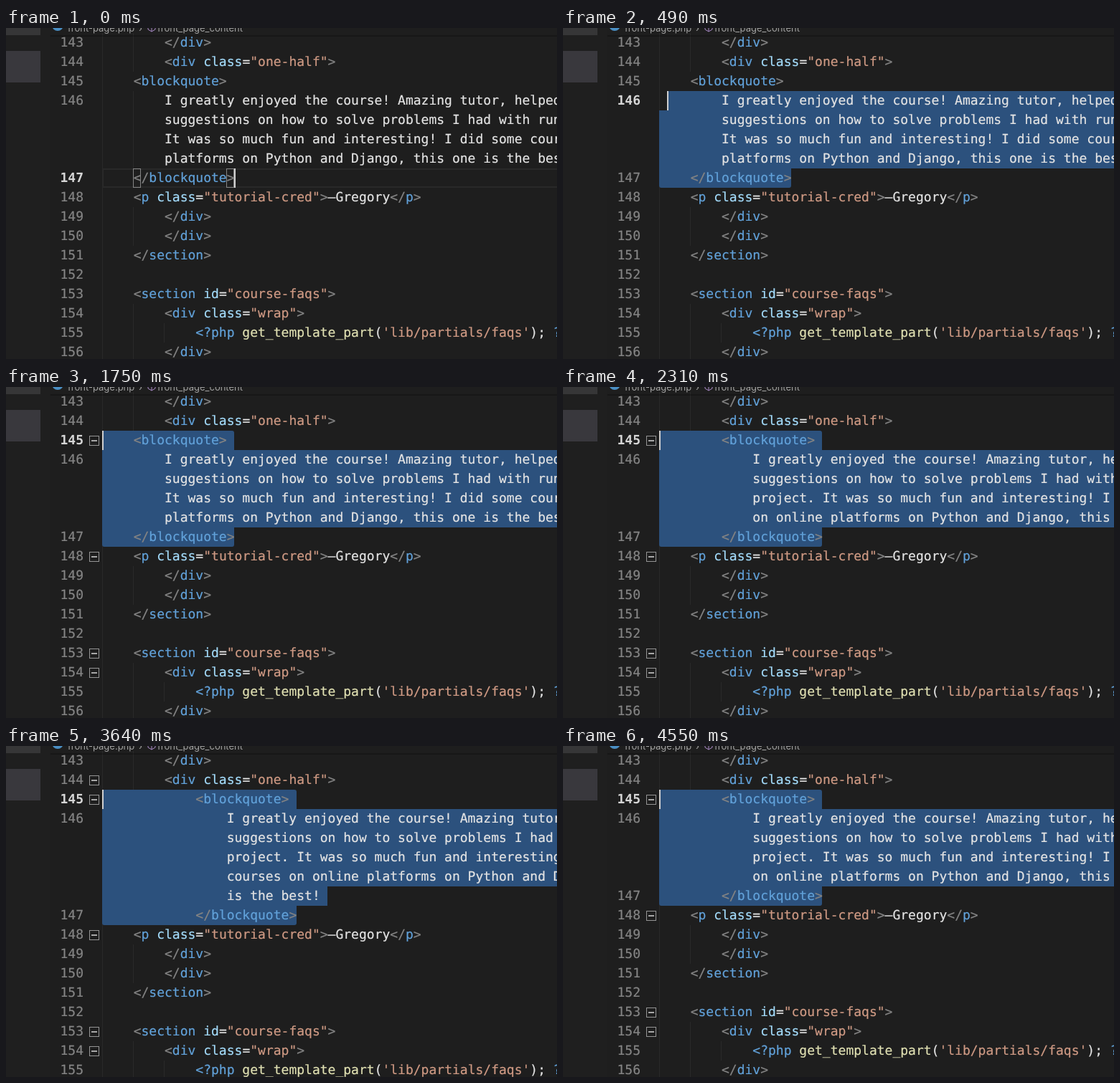
Recreate the animation shown at these times as an HTML page. Size 768 by 462 pixels, loop 4620 ms.

```html
<!DOCTYPE html>
<html lang="en">
<head>
<meta charset="utf-8">
<title>Indenting a block of code</title>
<style>
  html, body { margin: 0; width: 768px; height: 462px; overflow: hidden; background: #1e1e1e; }
  #stage { position: relative; width: 768px; height: 462px; overflow: hidden; }
  #stage div { position: absolute; box-sizing: border-box; }
  #code, #side, #crumbs { left: 0; top: 0; width: 768px; height: 462px; }
  .text, .num {
    height: 27px; white-space: pre; color: #e4e4e4;
    font: 18px/27px "DejaVu Sans Mono", monospace;
    text-rendering: geometricPrecision; font-variant-ligatures: none;
    -webkit-text-stroke: .2px;
  }
  .num { left: 48px; width: 60px; text-align: right; color: #858585; }
  .num.on { color: #d6d6d6; font-weight: bold; -webkit-text-stroke: 0; }
  .p { color: #848484; }
  .t { color: #62a2da; }
  .a { color: #a3dbfa; }
  .s { color: #cf9a84; }
  .f { color: #e0e0b2; }
  .sel { background: #2c517d; height: 27px; }
  .guide { width: 1px; height: 27px; background: rgba(255, 255, 255, .05); }
  .line { left: 134px; width: 640px; height: 27px; border: 2px solid #292929; }
  .match { width: 11px; height: 27px; border: 1px solid #858585; }
  .caret { width: 2px; height: 27px; background: #cfcfcf; }
  .fold { left: 116px; width: 14px; height: 14px; border: 1px solid #959595; }
  .fold::after { content: ""; position: absolute; left: 2px; top: 5px; width: 8px; height: 2px; background: #a8a8a8; }
  .crumb { top: -10px; white-space: pre; color: #a2a2a2; font: 13px/20px Inter, sans-serif; }
</style>
</head>
<body>
<div id="stage">
  <div id="side">
    <div style="left:0;top:0;width:61px;height:462px;background:#1f1f1f"></div>
    <div style="left:0;top:0;width:48px;height:10px;background:#363637"></div>
    <div style="left:0;top:32px;width:48px;height:44px;background:#39383d"></div>
  </div>
  <div id="code"></div>
  <div id="crumbs">
    <div style="left:62px;top:10px;width:706px;height:2px;background:rgba(0,0,0,.25)"></div>
    <div style="left:64px;top:-12px;width:16px;height:16px;border-radius:50%;background:#4a8fc4"></div>
    <div class="crumb" style="left:86px">front-page.php</div>
    <div class="crumb" style="left:185px">›</div>
    <svg style="position:absolute;left:197px;top:-7px" width="12" height="13" fill="none" stroke="#a98ac8">
      <path d="M6 1 11 3.5V9L6 12 1 9V3.5ZM1 3.5 6 6 11 3.5M6 6V12"/>
    </svg>
    <div class="crumb" style="left:211px">front_page_content</div>
  </div>
</div>
<script>
const LOOP = 4620, STEP = 70;
const X0 = 134.3, CHAR = 10.836, TOP = 7, ROW = 27, FIRST = 2;
const code = document.getElementById('code');

// How the long paragraph wraps at each indent level
const QUOTE = [
  ['I greatly enjoyed the course! Amazing tutor, helped with',
   'suggestions on how to solve problems I had with running my project.',
   'It was so much fun and interesting! I did some courses on online',
   'platforms on Python and Django, this one is the best!'],
  ['I greatly enjoyed the course! Amazing tutor, helped with',
   'suggestions on how to solve problems I had with running my',
   'project. It was so much fun and interesting! I did some courses',
   'on online platforms on Python and Django, this one is the best!'],
  ['I greatly enjoyed the course! Amazing tutor, helped with',
   'suggestions on how to solve problems I had with running my',
   'project. It was so much fun and interesting! I did some',
   'courses on online platforms on Python and Django, this one',
   'is the best!']
];
const BEFORE = [[2, '</div>'], [2, '<div class="one-half">']];
const AFTER = [
  [1, '<p class="tutorial-cred">–Gregory</p>'],
  [2, '</div>'], [2, '</div>'], [1, '</section>'], [1, ''],
  [1, '<section id="course-faqs">'],
  [2, '<div class="wrap">'],
  [3, "<?php get_template_part('lib/partials/faqs'); ?>"],
  [2, '</div>']
];

const span = (cls, s) => `<span class="${cls}">${s.replace(/</g, '&lt;')}</span>`;
const TOKENS = /(<\?php|\?>)|(<\/?)(\w+)|("[^"]*"|'[^']*')|(>)|(\w+)(?==")|(get_\w+)/g;
const paint = s => s.replace(TOKENS, (m, php, open, tag, str, close, attr) =>
  php ? span('t', m) :
  open ? span('p', open) + span('t', tag) :
  span(str ? 's' : close ? 'p' : attr ? 'a' : 'f', m));

const colX = col => X0 + col * CHAR;
const edgeX = col => Math.floor(colX(col));
const rowY = row => TOP + row * ROW;
const box = (cls, x, y, extra = '', body = '') =>
  `<div class="${cls}" style="${x === null ? '' : `left:${x}px;`}top:${y}px;${extra}">${body}</div>`;

function rowsAt(level) {
  let n = 143;
  const one = ([indent, text]) => ({ num: n++, indent, text });
  const rows = BEFORE.map(one);
  rows.push(one([1 + level, '<blockquote>']));
  QUOTE[level].forEach((text, i) =>
    rows.push({ num: i ? 0 : n, indent: 2 + level, text }));
  n++;
  rows.push(one([1 + level, '</blockquote>']));
  return rows.concat(AFTER.map(one));
}

// Pose at a time: indent level, caret place, fold marks
function pose(t) {
  const level = t < 2100 ? 0 : t < 2450 ? 1 : t < 4200 ? 2 : 1;
  if (t >= 560) return { level, row: FIRST, col: 0, folds: t >= 630 };
  const p = Math.min(1, Math.max(0, (t - 140) / 350));
  return { level, row: Math.round(7 - 4 * p), col: Math.round(17 - 16 * p), folds: false };
}

function selection(rows, last, { row, col }) {
  let out = '';
  const endCol = r => 4 * rows[r].indent + rows[r].text.length;
  for (let r = row; r <= last; r++) {
    const x = edgeX(r === row ? col : 0);
    const wraps = r + 1 < last && r > FIRST;
    const right = wraps ? 780 : edgeX(endCol(r) + (r < last ? 1 : 0));
    const round = r === last ? 'border-radius:0 0 3px 3px;' : r === row ? 'border-radius:3px 3px 0 0;' : '';
    out += box('sel', x, rowY(r), `width:${right - x}px;${round}`);
  }
  return out;
}

function draw(state) {
  const { level, row, col, folds } = state;
  const rows = rowsAt(level);
  const last = rows.findIndex(r => r.text === '</blockquote>');
  const idle = row === last && col === 17;
  let active = row;
  while (!rows[active].num) active--;

  let guides = '', text = '';
  rows.forEach((r, i) => {
    const y = rowY(i);
    for (let k = 0; k < r.indent; k++) guides += box('guide', edgeX(4 * k), y);
    if (r.num) text += box(i === active ? 'num on' : 'num', null, y, '', r.num);
    text += box('text', colX(4 * r.indent), y, '', paint(r.text));
    const opens = [145, 148, 153, 154].includes(r.num) || (r.num === 144 && level === 2);
    if (folds && opens) text += box('fold', null, y + 7);
  });
  const back = idle
    ? box('line', null, rowY(last)) + box('match', edgeX(4), rowY(last)) + box('match', edgeX(16), rowY(last))
    : selection(rows, last, state);
  code.innerHTML = guides + back + text + box('caret', edgeX(col), rowY(row));
}

let shown = '';
const start = performance.now();
function tick(now) {
  const t = Math.max(0, now - start) % LOOP;
  const state = pose(Math.floor(t / STEP) * STEP);
  const key = JSON.stringify(state);
  if (key !== shown) { draw(state); shown = key; }
  requestAnimationFrame(tick);
}
tick(start);
</script>
</body>
</html>
```
